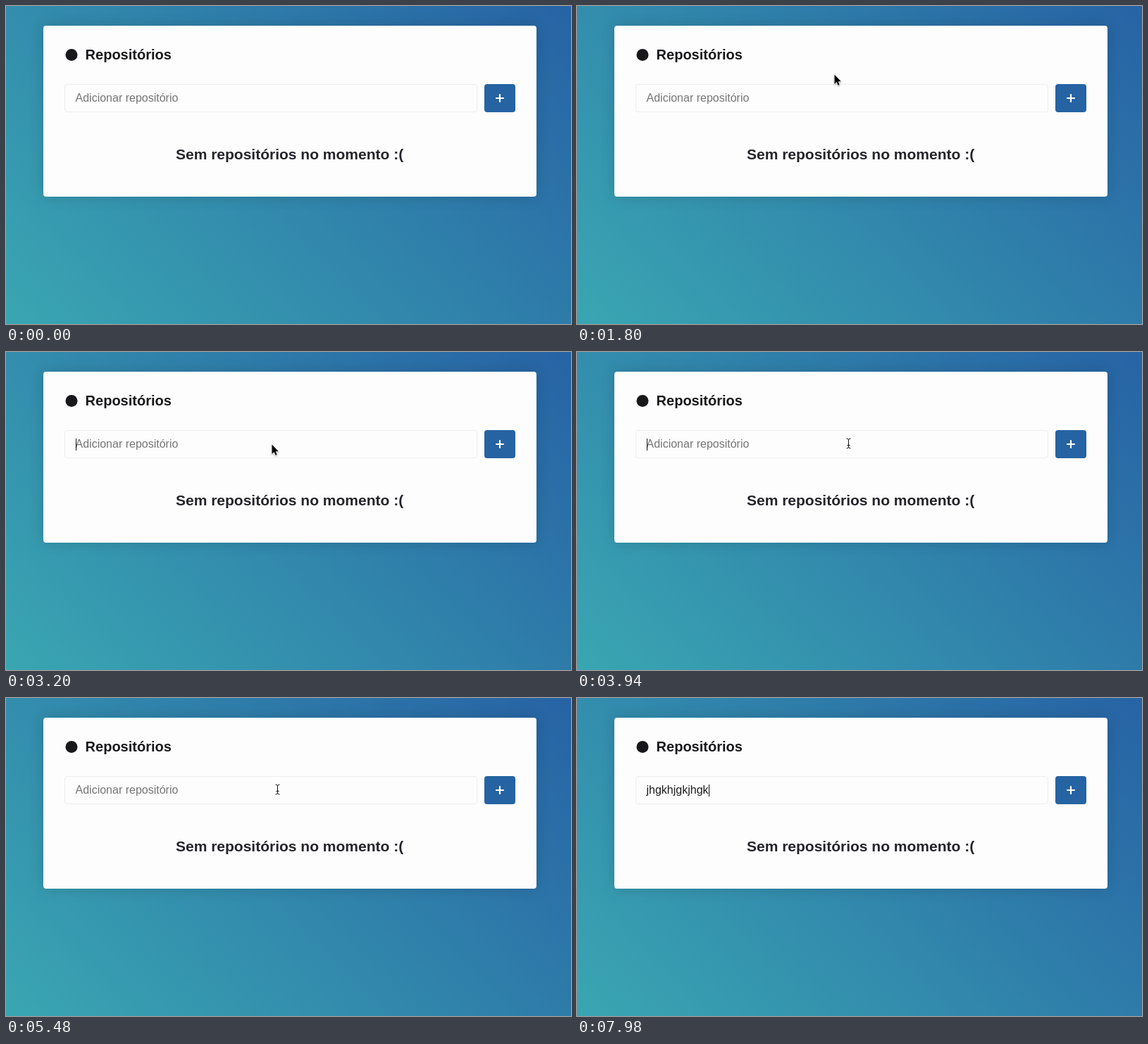
Animation of 802 by 452 pixels, one loop 8000 ms. Source, as an HTML page:

```html
<!DOCTYPE html>
<html lang="pt">
<head>
<meta charset="utf-8">
<title>Repositórios</title>
<style>
  html, body { margin: 0; width: 100%; height: 100%; overflow: hidden; }
  body {
    position: relative;
    font: 16px "Liberation Sans", Arial, sans-serif;
    background: linear-gradient(45deg, #3aa6b2, #2763a5);
  }
  .card {
    position: absolute; left: 53px; top: 28px; width: 700px; height: 243px;
    border-radius: 4px; background: #fdfdfd; box-shadow: 0 0 20px rgba(0, 0, 0, .15);
  }
  svg { position: absolute; left: 0; top: 0; display: block; }
  text { white-space: pre; }
  .bold { font-weight: bold; }
  #arrow { filter: drop-shadow(0 1px 1px rgba(0, 0, 0, .3)); }
</style>
</head>
<body>
<div class="card"></div>
<svg width="802" height="452" viewBox="0 0 802 452">
  <circle cx="93" cy="69.5" r="8.5" fill="#18181b"/>
  <text class="bold" x="112.6" y="76" font-size="20" fill="#18181b">Repositórios</text>

  <rect x="83.5" y="111.5" width="585" height="39" rx="3.5" fill="none" stroke="#eee"/>
  <text id="field" x="98.5" y="136"></text>
  <rect id="caret" y="123" width="1" height="17" fill="#111"/>

  <rect x="679" y="111" width="44" height="40" rx="4" fill="#2563a3"/>
  <path d="M696 131h10M701 126v10" stroke="#fff" stroke-width="2.2" stroke-linecap="round"/>

  <text class="bold" x="402.6" y="218" font-size="21" fill="#24242a" text-anchor="middle">Sem repositórios no momento :(</text>

  <path id="arrow" d="M.5 .5V14L3.6 11.1L5.6 15.8L7.7 14.9L5.7 10.3H9.8Z"
    fill="#000" stroke="#fff" stroke-width="1.2" paint-order="stroke"/>
  <path id="beam" d="M-2.5 -7Q.5 -7 .5 -5Q.5 -7 3.5 -7M.5 -5.5V5.5M-2.5 7Q.5 7 .5 5Q.5 7 3.5 7M-1.5 2.5H2.5"
    fill="none" stroke="#111"/>
</svg>
<script>
  const LOOP = 8000;
  const CLICK = 2900, BEAM = 3400, TYPE = 5600, BLINK = 500;
  const TYPED = 'jhgkhjgkjhgk';
  const HINT = 'Adicionar repositório';
  // time, x, y of the pointer
  const path = [[1200, 335, -18], [1750, 365, 97], [1900, 365, 97], [2400, 377, 131],
                [3200, 377, 131], [BEAM, 385, 130]];

  const [field, caret, arrow, beam] =
    ['field', 'caret', 'arrow', 'beam'].map(id => document.getElementById(id));
  const show = (el, on) => el.setAttribute('visibility', on ? 'visible' : 'hidden');
  const ease = p => p * p * (3 - 2 * p);

  function pointerAt(t) {
    const next = path.findIndex(point => point[0] > t);
    if (next === 0) return path[0].slice(1);
    if (next < 0) return path[path.length - 1].slice(1);
    const [t0, x0, y0] = path[next - 1], [t1, x1, y1] = path[next];
    const p = ease((t - t0) / (t1 - t0));
    return [x0 + (x1 - x0) * p, y0 + (y1 - y0) * p];
  }

  function lettersAt(t) {
    if (t < TYPE) return 0;
    const quick = 1 + Math.floor((t - TYPE) / 180);
    return quick <= 6 ? quick : Math.min(12, 6 + Math.floor((t - TYPE - 900) / 230));
  }

  function draw(now) {
    const t = now % LOOP;
    const typed = TYPED.slice(0, lettersAt(t));

    field.textContent = typed || HINT;
    field.setAttribute('fill', typed ? '#1c1c1c' : '#757575');
    caret.setAttribute('x', typed ? Math.round(98.7 + field.getComputedTextLength()) : 99);
    show(caret, typed || (t >= CLICK && Math.floor((t - CLICK) / BLINK) % 2 === 0));

    const move = `translate(${pointerAt(t).map(Math.round)})`;
    arrow.setAttribute('transform', move);
    beam.setAttribute('transform', move);
    show(arrow, t >= path[0][0] && t < BEAM);
    show(beam, t >= BEAM && !typed);
  }

  const start = performance.now();
  function tick() {
    draw(performance.now() - start);
    requestAnimationFrame(tick);
  }
  tick();
</script>
</body>
</html>
```
